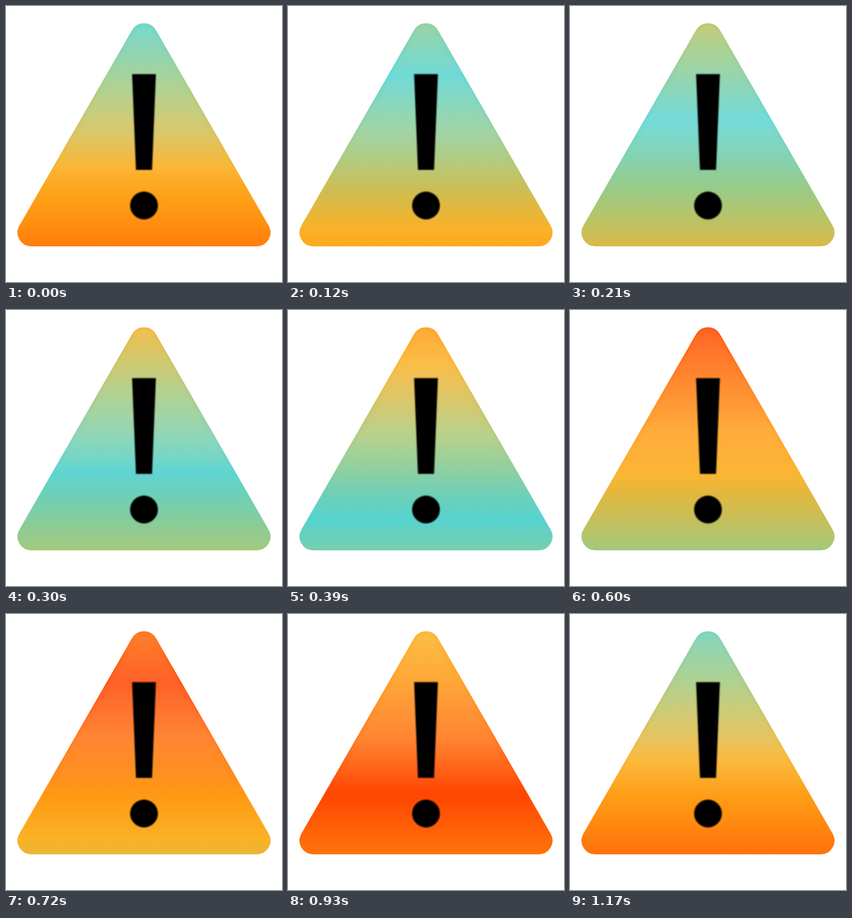
Animation of 480x480 px, one loop 1.2 s. Source, as an HTML page:

```html
<!DOCTYPE html>
<html lang="en">
<head>
<meta charset="utf-8">
<title>Warning sign</title>
<style>
  html, body { margin: 0; width: 100%; height: 100%; overflow: hidden; background: #fff; }
  svg { display: block; width: 100%; height: 100%; }
</style>
</head>
<body>
<svg viewBox="0 0 480 480">
  <defs>
    <!-- Half a colour cycle, mirrored: 1080 units per full period -->
    <linearGradient id="heat" gradientUnits="userSpaceOnUse" x1="0" y1="12" x2="0" y2="552" spreadMethod="reflect">
      <stop offset="0" stop-color="#56d3d0"/>
      <stop offset=".25" stop-color="#a3c97c"/>
      <stop offset=".5" stop-color="#fbb126"/>
      <stop offset=".63" stop-color="#ff9a14"/>
      <stop offset="1" stop-color="#ff4400"/>
    </linearGradient>
    <linearGradient id="sheen" gradientUnits="userSpaceOnUse" x1="0" y1="30" x2="0" y2="318">
      <stop offset="0" stop-color="#fff" stop-opacity=".14"/>
      <stop offset=".65" stop-color="#fff" stop-opacity=".17"/>
      <stop offset="1" stop-color="#fff" stop-opacity="0"/>
    </linearGradient>
    <filter id="glow"><feGaussianBlur stdDeviation="5"/></filter>
    <filter id="soft"><feGaussianBlur stdDeviation=".9"/></filter>
    <path id="sign" d="M219.2 42A24 24 0 0 1 260.8 42L456.8 382A24 24 0 0 1 436 418H44A24 24 0 0 1 23.2 382Z"/>
    <clipPath id="inside"><use href="#sign"/></clipPath>
  </defs>
  <use href="#sign" fill="url(#heat)"/>
  <g clip-path="url(#inside)">
    <use href="#sign" fill="url(#sheen)" filter="url(#glow)"/>
  </g>
  <g filter="url(#soft)">
    <path d="M219.3 118.5H260.7L254 285H226Z"/>
    <circle cx="240" cy="347" r="24.2"/>
  </g>
</svg>
<script>
  const LOOP = 1200, STEP = 30, PERIOD = 1080;
  const heat = document.getElementById('heat');

  function draw(now) {
    const time = Math.floor((now % LOOP) / STEP) * STEP;
    heat.setAttribute('gradientTransform', `translate(0 ${PERIOD * time / LOOP})`);
    requestAnimationFrame(draw);
  }
  draw(performance.now());
</script>
</body>
</html>
```
